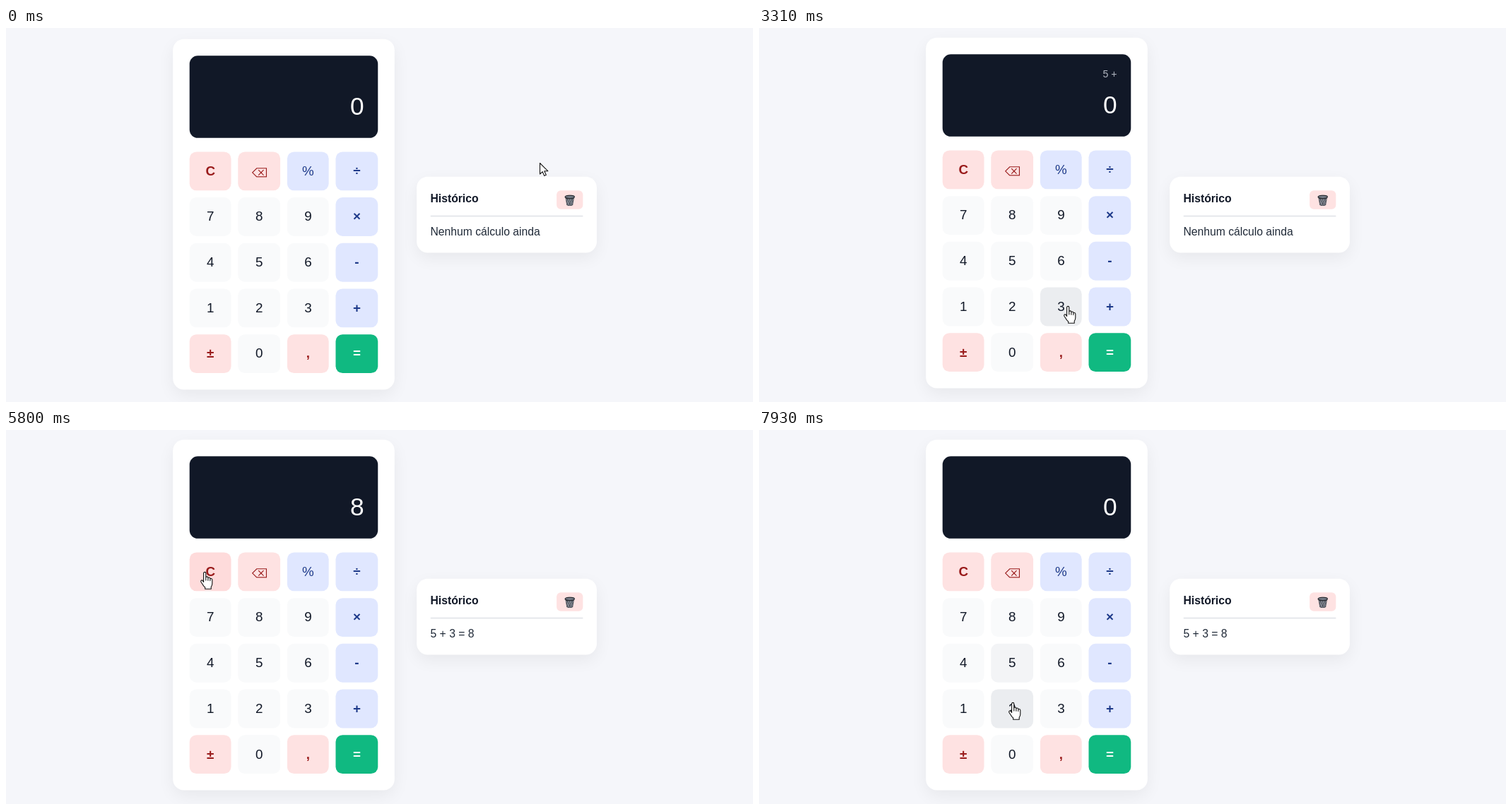
These frames come from a looping animation (1057 px wide and 530 px high, 7.99 s). An HTML page:

```html
<!DOCTYPE html>
<html lang="pt-BR">
<head>
<meta charset="utf-8">
<title>Calculadora</title>
<style>
  html, body { margin: 0; width: 100%; height: 100%; overflow: hidden; background: #f5f6fa; }
  body { position: relative; font-family: "Liberation Sans", Arial, sans-serif; color: #111827; }
  #page { position: absolute; left: 0; top: 0; transform: scale(.98); transform-origin: 0 0; }
  #page div, #page svg, #cursor, #cursor svg, #ring { position: absolute; }
  .card { background: #fff; border-radius: 16px; box-shadow: 0 8px 24px rgba(0, 0, 0, .06); }
  #calc { left: 240.9px; top: 16px; width: 320px; height: 507px; }
  #display { left: 24px; top: 24px; width: 272px; height: 119px; border-radius: 12px; background: #111827; }
  #expr, #main { right: 20px; line-height: 1; white-space: pre; }
  #expr { top: 21.3px; font-size: 14.4px; color: #b3b8c2; }
  #main { top: 54.5px; font-size: 36px; color: #fff; }
  #page .key { width: 60.5px; height: 56px; border-radius: 10px; font-size: 19.2px;
    display: flex; align-items: center; justify-content: center; }
  .danger { color: #991b1b; font-weight: bold; }
  .op { color: #1e3a8a; font-weight: bold; }
  .equal { color: #fff; font-weight: bold; }
  .thin { font-weight: normal; }
  #history { left: 592.8px; top: 214.5px; width: 260px; height: 110.5px; font-size: 16px; line-height: 1; white-space: pre; }
  #title { left: 20px; top: 24.9px; font-weight: bold; }
  #trash { left: 202px; top: 20px; width: 38px; height: 27px; border-radius: 6px; background: #fee2e2; }
  #rule { left: 20px; top: 56.5px; width: 220px; height: 1.6px; background: #e5e7eb; }
  #log { left: 20px; top: 72.9px; color: #1f2937; }
  #ring { width: 24px; height: 24px; margin: -12px; border-radius: 50%; background: rgba(255, 255, 0, .5); }
  #cursor svg { overflow: visible; }
  #cursor path { fill: #fff; stroke: #111; stroke-width: 1.1; stroke-linejoin: round; stroke-linecap: round; }
</style>
</head>
<body>
<div id="page">
  <div id="calc" class="card">
    <div id="display"><div id="expr"></div><div id="main">0</div></div>
  </div>
  <div id="history" class="card">
    <div id="title">Histórico</div>
    <div id="trash">
      <svg style="left:11px;top:6px" width="16" height="17" viewBox="0 0 16 17">
        <path d="M1.5 3.5 3.5 15Q8 17.5 12.5 15L14.5 3.5Z" fill="#4b5059"/>
        <path d="M3 6 7.5 15.5M6 6 11 15M9 6 12 13M13 6 8.5 15.5M10 6 5 15M7 6 4 13" stroke="#a3a8b2" stroke-width=".7"/>
        <ellipse cx="8" cy="3.2" rx="6.8" ry="2.3" fill="#777d88" stroke="#25282e" stroke-width="1.2"/>
      </svg>
    </div>
    <div id="rule"></div>
    <div id="log"></div>
  </div>
</div>
<div id="ring"></div>
<div id="cursor">
  <svg id="arrow" width="13" height="20"><path d="M.5 .5V16L4.2 12.7 6.7 18.4 9.3 17.3 6.8 11.7H11.8Z"/></svg>
  <svg id="hand" style="left:-6px" width="18" height="25"><path d="M4.6 14.5V2Q4.6 .4 6.2 .4T7.8 2V8.2Q8 6.8 9.4 6.9T10.9 8.4V9.2Q11.2 7.9 12.5 8T13.9 9.5V10.4Q14.3 9.3 15.5 9.5T16.8 11V16.5Q16.8 19.5 15.2 21.4V24.2H6.7V22Q4.2 20 3.2 17.8L.9 14.2Q.2 12.6 1.5 12T3.6 13Z M7.8 8.2V12M10.9 9V12.3M13.9 10.2V12.6"/></svg>
</div>
<script>
const LOOP = 7990, FRAME = 67, FADE = 200, SCALE = .98;
const $ = id => document.getElementById(id);
const clamp = v => Math.max(0, Math.min(1, v));

// Pointer stops: time, x, y, ease-out power of the way there
const path = [
  [0, 754.5, 191], [550, 357, 326, 2.3], [1950, 357, 326], [2170, 425, 345],
  [2310, 449, 378], [2570, 494, 391, 2], [2960, 494, 391], [3310, 437, 394, 1.5],
  [3380, 444, 400], [3790, 444, 400], [4130, 503, 450, 1.7], [4410, 503, 450],
  [4870, 546, 430, 1.6], [5000, 546, 430], [5800, 281, 201], [5940, 303, 198],
  [6470, 303, 198], [6600, 400, 332], [6740, 418, 330], [7320, 362, 330, 1.6],
  [7650, 362, 330], [7930, 359, 386, 2], [LOOP, 359, 386]
];
const clicks = [1750, 2710, 3580, 4190, 6130];
const states = [
  [0, '', '0', ''], [1890, '', '5', ''], [2850, '5 +', '0', ''],
  [3720, '5 +', '3', ''], [4330, '', '8', '5 + 3 = 8'], [6270, '', '0', '5 + 3 = 8']
];

const palette = {
  num: [[249, 250, 251], [229, 231, 235]],
  danger: [[254, 226, 226], [254, 202, 202]],
  op: [[224, 231, 255], [199, 210, 254]],
  equal: [[16, 185, 129], [5, 150, 105]]
};
const kindOf = s => 'C⌫±,'.includes(s) ? 'danger' : '%÷×-+'.includes(s) ? 'op' : s === '=' ? 'equal' : 'num';
const backspace = '<svg style="position:relative;top:2px" width="22" height="14" viewBox="0 0 22 14" fill="none" stroke="#991b1b" stroke-width="1.2"><path d="M.8 7 7 .8H21V13.2H7ZM9.5 3.2 17 10.8M17 3.2 9.5 10.8"/></svg>';

const keys = [...'C⌫%÷789×456-123+±0,='].map((symbol, i) => {
  const el = document.createElement('div'), kind = kindOf(symbol);
  el.className = `key ${kind}${symbol === '%' ? ' thin' : ''}`;
  el.style.left = 24 + i % 4 * 70.5 + 'px';
  el.style.top = 163 + Math.floor(i / 4) * 66 + 'px';
  if (symbol === '⌫') el.innerHTML = backspace;
  else el.textContent = symbol;
  $('calc').append(el);
  return { el, colors: palette[kind], spans: [] };
});
const card = { spans: [] };

function pointer(t) {
  const i = path.findIndex(p => p[0] > t);
  const [t0, x0, y0] = path[i - 1], [t1, x1, y1, power = 1] = path[i];
  const steps = Math.max(1, Math.round((t1 - t0) / FRAME));
  const u = Math.floor((t - t0) / (t1 - t0) * steps + 1e-6) / steps;
  const s = 1 - (1 - u) ** power;
  return [x0 + (x1 - x0) * s, y0 + (y1 - y0) * s];
}

function keyAt([x, y]) {
  const cx = x / SCALE - 264.9, cy = y / SCALE - 177;
  const col = Math.floor(cx / 70.5), row = Math.floor(cy / 66);
  const inside = col >= 0 && col < 4 && row >= 0 && row < 5 && cx % 70.5 < 60.5 && cy % 66 < 56;
  return inside ? keys[row * 4 + col] : null;
}

// Record when the pointer is over each target
function extend(target, t) {
  const last = target.spans.at(-1);
  if (last && last[1] === t) last[1] = t + 10;
  else target.spans.push([t, t + 10]);
}
for (let t = 0; t < LOOP; t += 10) {
  const p = pointer(t), key = keyAt(p);
  if (key) extend(key, t);
  if (p[0] > 236 && p[0] < 549.7 && p[1] > 14 && p[1] < 511) extend(card, t);
}
const hover = (target, t) => Math.max(0, ...target.spans.map(([a, b]) =>
  clamp((Math.min(t, b) - a) / FADE) - Math.max(0, t - b) / FADE));

function draw(t) {
  const p = pointer(t), over = keyAt(p);
  $('calc').style.transform = `translateY(${-2 * hover(card, t)}px)`;
  for (const key of keys) {
    const k = hover(key, t), [a, b] = key.colors;
    key.el.style.background = `rgb(${a.map((v, i) => Math.round(v + (b[i] - v) * k))})`;
  }
  const [, expr, main, log] = states.findLast(s => s[0] <= t);
  $('expr').textContent = expr;
  $('main').textContent = main;
  $('log').textContent = log || 'Nenhum cálculo ainda';
  for (const id of ['cursor', 'ring']) {
    $(id).style.left = p[0] + 'px';
    $(id).style.top = p[1] + 'px';
  }
  $('arrow').style.display = over ? 'none' : '';
  $('hand').style.display = over ? '' : 'none';
  $('ring').style.display = clicks.some(c => t >= c && t < c + 200) ? '' : 'none';
}

const start = performance.now();
function tick() {
  draw((performance.now() - start) % LOOP);
  requestAnimationFrame(tick);
}
tick();
</script>
</body>
</html>
```
